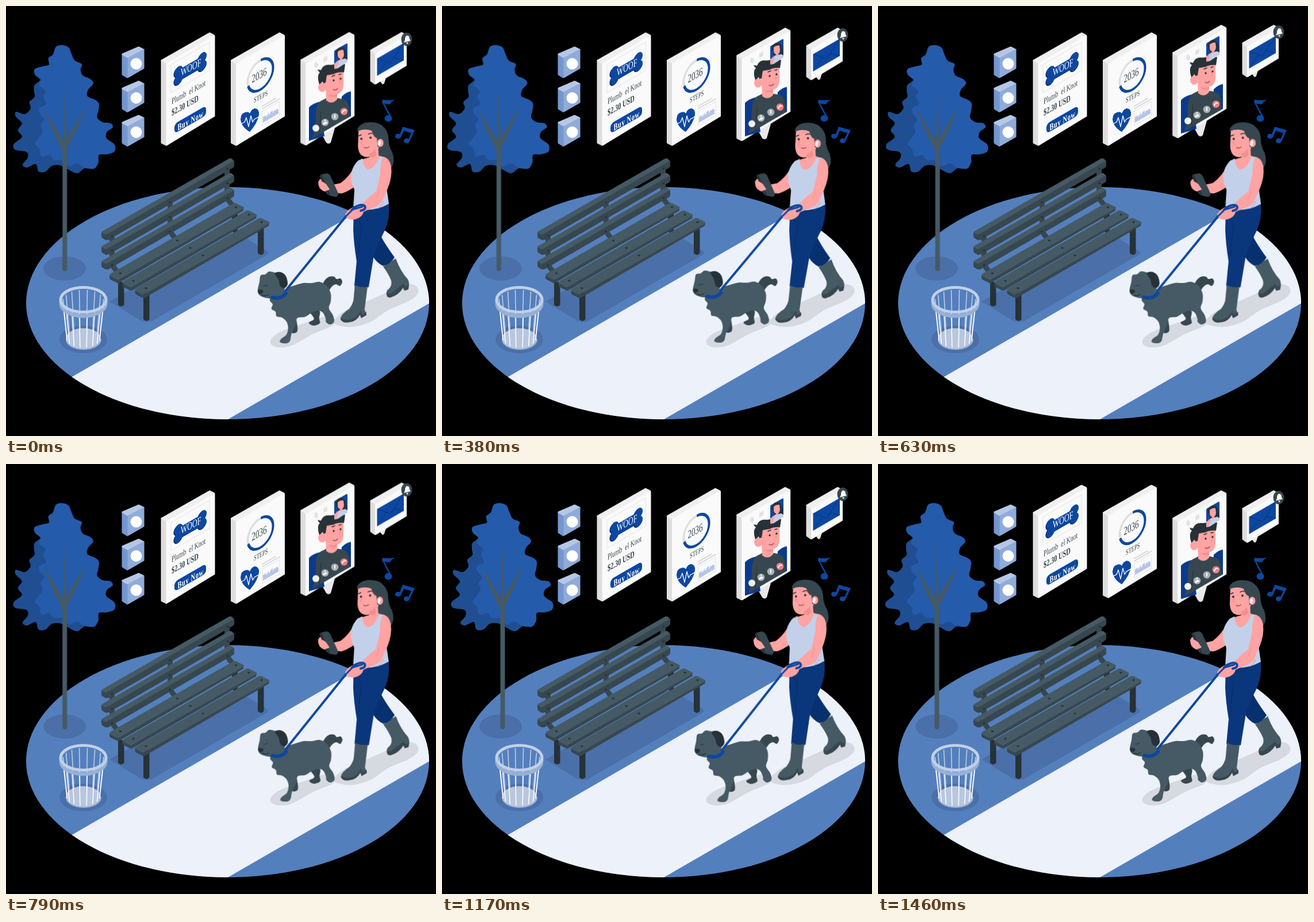
These frames come from a looping animation (748x748 px, 1500 ms). An HTML page:

```html
<!DOCTYPE html>
<html lang="en">
<head>
<meta charset="utf-8">
<title>Walk in the park</title>
<style>
html,body{margin:0;width:100%;height:100%;overflow:hidden;background:#000}
svg{display:block;width:100vw;height:100vh}
text{font-family:"Liberation Serif",serif;fill:#37474f}
.b{font-weight:bold}
.w{fill:#fff}
.blue{fill:#0d47a1}
.skin{fill:#ffa3a3}
.ink{fill:#263238}
.dark{fill:#37474f}
.mid{fill:#455a64}
.ln{fill:none;stroke-linecap:round;stroke-linejoin:round}
.tree{animation:shake 1.5s linear -30ms infinite}
.float{animation:float 1.5s linear -30ms infinite}
.late{animation:late 1.5s linear infinite}
.walk{transform-origin:570px 394px;animation:wind 1.5s linear -30ms infinite}
@keyframes shake{
  10%,90%{transform:translateX(-1.5px)}
  20%,80%{transform:translateX(3px)}
  30%,50%,70%{transform:translateX(-6px)}
  40%,60%{transform:translateX(6px)}
}
@keyframes float{50%{transform:translateY(-15px)}}
@keyframes late{0%,64.67%{transform:none}100%{transform:translateY(-10.6px)}}
@keyframes wind{25%{transform:rotate(1deg)}75%{transform:rotate(-1deg)}}
</style>
</head>
<body>
<svg viewBox="0 0 748 748">
<defs>
  <clipPath id="disc"><ellipse cx="385.5" cy="517" rx="350.5" ry="202"/></clipPath>
  <g id="cube" stroke-width="3" stroke-linejoin="round">
    <path d="M203 85l8 5v34l-8-5z" fill="#7596cf" stroke="#7596cf"/>
    <path d="M203 84l28-12 8 4-27 13z" fill="#b6c7e5" stroke="#b6c7e5"/>
    <path d="M213 91l26-14v31l-26 15z" fill="#8fabda" stroke="#8fabda"/>
    <circle cx="226.500" cy="100.500" r="10" fill="#fff"/>
  </g>
  <g id="panel" stroke-width="2" stroke-linejoin="round">
    <path d="M270.500 95l8 4.500V242l-8-4z" fill="#dedede" stroke="#dedede"/>
    <path d="M270.500 94.500L354 47l8 4-83.500 48z" fill="#efefef" stroke="#efefef"/>
    <path d="M279.500 100L362.500 52v139.500l-83 50.500z" fill="#fafafa" stroke="#fafafa"/>
  </g>
  <g id="back">
    <path class="mid" d="M166 396q-1-3 3-5L387 266q3-2 6 0l4 4-222 130z"/>
    <path class="dark" d="M174 398L397 269v9q0 2-3 4L180 406q-3 2-7 1l-5-3q-2-1-2-4v-6z"/>
  </g>
  <g id="seat">
    <path class="dark" d="M180 468l15 8 218-126v6L198 481q-3 2-6 0l-10-5q-2-1-2-4z"/>
    <path class="mid" d="M180 469q0-2 3-4L394 344q3-2 6-1l12 6q4 2 0 4L196 475q-3 1-5 0z"/>
    <g class="ink"><ellipse cx="199" cy="465" rx="2.200" ry="1.400"/><ellipse cx="298" cy="408" rx="2.200" ry="1.400"/><ellipse cx="400" cy="350" rx="2.200" ry="1.400"/></g>
  </g>
  <path id="post" class="ln" d="M184.500 399v46q0 10 12 19" stroke="#37474f" stroke-width="9"/>
  <g id="bone">
    <rect x="-25" y="-9.500" width="50" height="19" rx="4"/>
    <circle cx="-24" cy="-7" r="8.500"/><circle cx="-24" cy="7" r="8.500"/>
    <circle cx="24" cy="-7" r="8.500"/><circle cx="24" cy="7" r="8.500"/>
  </g>
</defs>

<g clip-path="url(#disc)">
  <rect width="748" height="748" fill="#547fbd"/>
  <path d="M115 645L740 284V515L386 719 300 748H115z" fill="#edf1f9"/>
</g>
<g fill="#4b6fa8">
  <ellipse cx="102" cy="456.500" rx="37" ry="21"/>
  <ellipse cx="134.500" cy="580" rx="41.500" ry="24"/>
  <path d="M180 514l200-115q16-8 30 0l45 28q2 3-2 6L256 547q-11 6-22 0z"/>
</g>
<g fill="#d6d9e0">
  <path class="s" d="M570 548 580 556 605 558 635 549 665 529 703 512 717 499 713 487 694 484 665 497 625 515 590 530"/>
  <path class="s" d="M460 582 464 591 480 594 501 589 533 571 568 556 572 546 555 540 515 553 475 568"/>
</g>

<g class="tree">
  <path fill="#204e92" class="s" d="M54 134 49 147 50 158 41 167 43 178 33 188 18 184 17 192 28 204 21 216 28 228 14 240 16 250 36 254 38 264 29 276 37 281 52 275 57 288 69 288 80 278 94 277 108 284 124 291 138 282 154 283 158 268 150 200 95 120"/>
  <path fill="#255bab" class="s" d="M97 68 87 71 82 84 74 91 75 102 64 105 50 110 51 120 60 128 58 138 69 148 65 158 70 171 58 178 60 189 67 197 61 207 64 219 56 231 50 240 58 248 62 262 76 259 84 268 100 268 110 279 124 274 138 282 154 282 161 272 162 259 176 258 189 253 189 241 175 230 176 219 186 211 182 204 168 202 159 194 161 182 162 170 155 163 142 157 143 146 152 135 147 127 134 121 130 111 132 101 120 95 114 83 109 72"/>
  <path class="mid" d="M102.500 138L105 231 138 176q-14 40-31.500 70V459q-4 5-8 0V252Q78 214 66 179l34 56z"/>
</g>

<g class="ln">
  <ellipse cx="134.500" cy="578.500" rx="30" ry="18" fill="#dce4f0" opacity=".75"/>
  <path d="M105 580a30 17 0 0 0 60 0" stroke="#9fb4d3" stroke-width="2"/>
  <g id="bars" stroke="#fff" stroke-width="1.500"></g>
  <path d="M92.500 511v7a42 24.500 0 0 0 84 0v-7a42 24.500 0 0 1-84 0z" fill="#98b0d6"/>
  <ellipse cx="134.500" cy="511" rx="39.500" ry="21.500" stroke="#c0d0e8" stroke-width="5"/>
</g>

<g class="ink">
  <path d="M195 480h10.500v40q-5 5-10.500 0zM393 360h10v32q-5 5-10 0z"/>
  <path d="M239 498h10.500v47q-5 6-10.500 0zM438 380h10.500v50q-5 6-10.500 0z"/>
</g>
<use href="#post"/><use href="#post" x="101" y="-58"/><use href="#post" x="200" y="-116"/>
<use href="#back" y="51"/><use href="#back" y="25.500"/><use href="#back"/>
<g id="bolts" class="ink"></g>
<use href="#seat"/><use href="#seat" x="22.500" y="13"/><use href="#seat" x="44.500" y="26"/>

<use href="#cube"/><use href="#cube" y="59.500"/><use href="#cube" y="119"/>

<g class="late">
  <use href="#panel"/>
  <path d="M287 102l67-39v49l-67 39z" fill="none" stroke="#e4e4e4"/>
  <use href="#bone" fill="#0a3276" transform="matrix(.866 -.5 0 1 319.500 110.500)"/>
  <use href="#bone" fill="#0d47a1" transform="matrix(.866 -.5 0 1 321 108.500)"/>
  <text class="w" transform="matrix(.65 -.34 0 1 304 122)" font-size="18.500">WOOF</text>
  <text transform="matrix(.65 -.36 0 1 288 171)" font-size="15">Plumb&#160;&#160;el Knot</text>
  <text class="b" transform="matrix(.65 -.36 0 1 288 191)" font-size="16">$2.30 USD</text>
  <rect class="blue" transform="matrix(1 -.577 0 1 293 205)" width="55" height="17" rx="6"/>
  <text class="w b" transform="matrix(.65 -.36 0 1 298.500 217)" font-size="16" letter-spacing="1">Buy Now</text>
</g>

<g class="late">
  <use href="#panel" x="121.500"/>
  <g transform="matrix(.866 -.5 0 1 442.500 120)" fill="none" stroke-width="4.500">
    <circle r="25.500" stroke="#dedede"/>
    <circle r="25.500" stroke="#0d47a1" pathLength="100" stroke-dasharray="70 30" transform="rotate(-88)"/>
  </g>
  <text transform="matrix(.65 -.36 0 1 427.500 134)" font-size="20">2036</text>
  <text transform="matrix(.65 -.36 0 1 431 168.500)" font-size="13">STEPS</text>
  <path class="blue" d="M424 187q3-8 9-9 8 1 7 11-2 14-16 30-15-9-16-22 1-11 8-12 6-2 8 2z"/>
  <path class="ln" d="M409 205l6-3 3-8 4 16 4-19 3 11 3-5 7-4" stroke="#fff" stroke-width="1.300"/>
  <path class="ln" d="M446 174l23-13M446 178.500l30-17" stroke="#d8d8d8" stroke-width="2"/>
  <path d="M446 183l30-17v25l-30 17z" fill="none" stroke="#e2e2e2"/>
  <path d="M447 203v-9l3-4v3l3-4v5l4-9v5l3-3v-2l4-4v6l3-6 3 1v-3l4 1v7z" fill="#b4c5e6"/>
</g>

<g class="float">
  <path d="M548 222l9 16q4 4 8 0l7-25z" fill="#e9e9e9"/>
  <use href="#panel" x="242.700"/>
  <path fill="#0a3a8c" d="M527 177q6-7 19-10l8 60-27 8zM584 158q8-8 16-9v43l-18 10z"/>
  <path class="dark" d="M533 231q6-22 6-40-1-17 8-25l10-5h21l10 2q8 4 9 17l1 13z"/>
  <path d="M545 222l3-38" stroke="#263238" fill="none"/>
  <path class="skin" d="M556 143l1 22q10 8 19-2l-1-14z"/>
  <path d="M560 154q10 3 16-1v5q-9 3-16-4z" fill="#f28f8f"/>
  <ellipse class="skin" cx="550" cy="142" rx="7" ry="8"/>
  <path class="skin" d="M553 119q18-11 34-8v27q-1 15-13 16-14 0-19-11z"/>
  <path class="ink" d="M545 137q-5-15 1-21-3-2-4-5l6 1q4-11 17-9l14-2 11 1-2 14q-11-1-18 3l-12 2-2 13-4 1-1-3z"/>
  <g class="ln" stroke="#263238" stroke-width="1.400"><path d="M567 123l5-2M579 120l4-1"/><path d="M579 127q4 5 1 8" stroke="#f28f8f"/><path d="M569 146q5 2 8-2" stroke="#a34d56"/></g>
  <g class="ink"><circle cx="570" cy="130" r="1.700"/><circle cx="582" cy="127" r="1.700"/></g>
  <circle cx="539" cy="213" r="6" fill="#f1f1f1"/><circle cx="555" cy="203" r="6.300" fill="#a9b0b4"/><circle cx="572" cy="193" r="6.300" fill="#a9b0b4"/><circle cx="588" cy="184" r="6.300" fill="#ef7f86"/>
  <path class="ln" d="M552 206q3-5 6-2zM555 199v1M572 190v5M585 186q2-5 6-4" stroke="#fff" stroke-width="2"/>
  <ellipse cx="539.500" cy="103" rx="3.500" ry="5" fill="#e3e3e3"/><path d="M552 91l7-4v8l-7 4z" fill="#e3e3e3"/>
  <path class="blue" d="M571 80q0-2 2-3l19-11q2-1 2 1v30l-23 13z"/>
  <path class="ink s" d="M574 82 577 75 583 72 589 75 592 83 592 95 580 95"/>
  <path d="M571 101l9-7 10-2 4 2v4l-17 11-6 1z" fill="#c2d1e9"/>
  <path class="skin" d="M577 80q5-4 10-3l1 8q-1 6-3 6v4l-4 1v-4q-4-1-4-6z"/>
  <path class="skin" d="M571 103l5-7 3 2-4 10-4 2z"/>
</g>

<g class="float">
  <path d="M648 128l6 8q2 2 4-1l4-13z" fill="#e6e6e6"/>
  <g stroke-width="2" stroke-linejoin="round">
    <path d="M634.500 78l7 5v53l-7-5z" fill="#dedede" stroke="#dedede"/>
    <path d="M634.500 77.500L688 47l8 4-54 32z" fill="#efefef" stroke="#efefef"/>
    <path d="M643 84l53-32v52l-53 32z" fill="#fafafa" stroke="#fafafa"/>
  </g>
  <path class="blue" d="M645.500 92l46.500-27v30l-46.500 27z"/>
  <path d="M646 92l23 8 23-35M646 121l16-23M692 95l-17-4" fill="none" stroke="#08357d"/>
  <ellipse class="dark" cx="697" cy="58.500" rx="9.500" ry="11.500"/>
  <path class="w" d="M692 64l2-4q0-8 4-8 4 0 4 6l2 3zM696 64h4l-2 3z"/>
</g>

<g class="blue">
  <ellipse cx="665" cy="195.500" rx="6.500" ry="5.800"/>
  <path d="M669 196l-15-29 1-4q10 2 22 0-7 3-9 8l-10-1 13 24z"/>
  <ellipse cx="682" cy="226.500" rx="5" ry="4.300"/><ellipse cx="697" cy="234.500" rx="5" ry="4.300"/>
  <path d="M684 226l6-16 21 6-9 19-3-1 6-13-13-4-5 11z"/>
</g>

<g class="walk">
  <path class="mid" d="M656 453l22-14q8 22 21 36 4 8 1 15l-7 2-3-8-9 9q-10 12-18 6-2-4 4-8 5-6 3-14-5-12-14-24z"/>
  <path class="dark" d="M662 497q3 5 9 2l20-16 4 5 6-3-1 8-7 2-2-5q-8 13-22 17-8 1-7-10z"/>
  <path fill="#07306f" d="M622 385l29 13q8 16 25 39-7 12-20 15-11-5-18-17l-18-30z"/>
  <path fill="#0a367c" d="M605 350l61-6q2 26-7 46-17 34-20 50l-8 49q-12 4-25-2l4-43q-5-30-6-55z"/>
  <path d="M612 372q10 10 3 34-1 15-1 27" class="ln" stroke="#07306f" stroke-width="1.500"/>
  <path class="mid" d="M607 485q11 6 22 3l-5 40 3 8-9 6-3-7q-5 13-18 13-14 3-15-4 1-8 15-17 8-10 8-20z"/>
  <path class="dark" d="M582 543q10 5 18 2 12-3 17-16l2 8 8-5v6l-9 5-2-6q-6 12-18 13-14 3-16-7z"/>

  <path class="dark" d="M645 208q18 7 20 25 1 12 7 22 5 15-1 25l-16 4-18-24z"/>
  <path class="skin" d="M632 245l15-3 1 18 10 3 4 15-20 18-32-14 2-13 20-6z"/>
  <path class="skin" d="M614 267l-8 12q-8 17-24 29l-14 3 1 14 15 1q10-3 23-12z"/>
  <path fill="#c2d1e9" d="M611 270l9-5q1 15 8 19 12 1 21-21l8-1q-1 20 2 35l7 47q-28 16-62 8l2-32-5-14q-4-20 10-36z"/>
  <path class="skin" d="M656 262q11 2 14 18 2 17-6 37l-11 25q-6 7-18 10l-13 6q-2 9-14 13-13 2-18-5 0-9 13-16l14-4 15-14 12-10 7-30q-1-16 5-30z"/>
  <path d="M644 334q4-6 5-14M648 352q6-5 9-12" class="ln" stroke="#f28f8f"/>
  <path class="skin" d="M545 302q5-3 12 2l9 7 4 8q-8 6-18 3-11-8-7-20z"/>
  <path class="dark" d="M546 297q-1-3 3-4l9-2q4 1 6 4l14 31q0 5-4 6l-11-2q-5-2-7-7z"/>
  <path class="ink" d="M546 296l3-3 15 37-3-1z"/>
  <path class="skin" d="M543 305q7-1 14 5l6 9q-6 4-12 2-8-3-8-16z"/>
  <path class="skin" d="M613 216q16-9 34 1l4 14q-1 20-10 25-8 9-18 6-10-3-11-18z"/>
  <path d="M632 257q7-3 10-9l2 11q-6 8-12 2z" fill="#f28f8f"/>
  <path class="dark" d="M611 218q0-11 14-15 23-4 34 10 8 10 6 28l-9 9-10-6-1-14q-6-2-9-13-12-5-25 1z"/>
  <ellipse class="skin" cx="651" cy="238" rx="5.500" ry="7"/>
  <path class="ln" d="M650 236l-1 5" stroke="#fff" stroke-width="4"/>
  <g class="ln" stroke="#263238" stroke-width="1.500"><path d="M613 226l5-2M630 223q4-3 7-1"/><path d="M620 233q-5 7 1 8" stroke="#f28f8f"/><path d="M623 246q5 2 8-1" stroke="#a34d56"/></g>
  <g class="ink"><circle cx="618" cy="231" r="1.900"/><circle cx="634" cy="229" r="1.900"/></g>

  <path class="dark s" d="M550 490 554 478 562 471 571 471 575 475 582 474 585 480 581 487 574 484 567 488 560 496"/>
  <path class="dark s" d="M527 530 536 529 546 531 545 543 546 552 535 556 527 551 536 544M490 538 502 538 506 550 507 566 498 569 492 560"/>
  <path class="mid s" d="M464 503 459 512 464 519 462 527 469 532 471 540 480 542 488 549 491 560 488 572 479 579 477 585 487 587 494 583 497 570 504 555 507 543 520 541 530 535 542 530 551 533 556 543 557 550 564 554 571 549 569 538 562 526 565 514 565 500 558 487 546 480 532 482 517 482 503 486 489 491 478 500"/>
  <path class="mid s" d="M441 480 443 469 451 467 458 462 469 464 480 467 486 478 485 491 481 503 469 510 459 509 449 507 441 503 438 495"/>
  <path class="ink s" d="M468 465 478 463 487 470 490 484 484 491 477 487 474 476"/>
  <path class="ink" d="M438 495q5-4 10 1-2 6-7 5-3-2-3-6zM445 486q6 2 11-2-4 6-11 2z"/>
  <path class="ln" d="M446 503q6 3 11-1" stroke="#263238" stroke-width="1.500"/>
  <path class="ln" d="M463 507q16 4 24-7" stroke="#0d47a1" stroke-width="6"/>
  <path class="ln" d="M486 496L592 365l14-15q14-7 18-2 3 6-7 8" stroke="#0d47a1" stroke-width="4"/>
  <path class="skin" d="M590 362q5-9 13-7l7 5-4 9q-14 5-16-7z"/>
  <path class="ln" d="M591 366l12-12 17-5" stroke="#0d47a1" stroke-width="3"/>
</g>
</svg>
<script>
const $ = id => document.getElementById(id);

// Closed Catmull-Rom curve through each subpath's points.
function smooth(d) {
  return d.split('M').filter(Boolean).map(part => {
    const n = part.match(/[\d.]+/g).map(Number), p = [];
    for (let i = 0; i < n.length; i += 2) p.push([n[i], n[i + 1]]);
    const at = i => p[(i + p.length) % p.length];
    let out = 'M' + p[0];
    p.forEach((a, i) => {
      const b = at(i + 1), z = at(i - 1), c = at(i + 2);
      const c1 = a.map((v, k) => v + (b[k] - z[k]) / 6);
      const c2 = b.map((v, k) => v - (c[k] - a[k]) / 6);
      out += `C${c1} ${c2} ${b}`;
    });
    return out + 'Z';
  }).join('');
}
document.querySelectorAll('.s').forEach(e => e.setAttribute('d', smooth(e.getAttribute('d'))));

let bars = '';
for (let i = 0; i < 16; i++) {
  const a = (i + .5) * Math.PI / 8, x = Math.cos(a), y = Math.sin(a);
  bars += `<path d="M${134.5 + 36 * x} ${514 + 20 * y}L${134.5 + 29 * x} ${578 + 16 * y}" opacity="${y < 0 ? .65 : 1}"/>`;
}
$('bars').innerHTML = bars;

let bolts = '';
for (let row = 0; row < 3; row++)
  for (let col = 0; col < 3; col++)
    bolts += `<circle cx="${184.5 + 100.5 * col}" cy="${400 - 58.5 * col + 25.5 * row}" r="1.8"/>`;
$('bolts').innerHTML = bolts;
</script>
</body>
</html>
```
